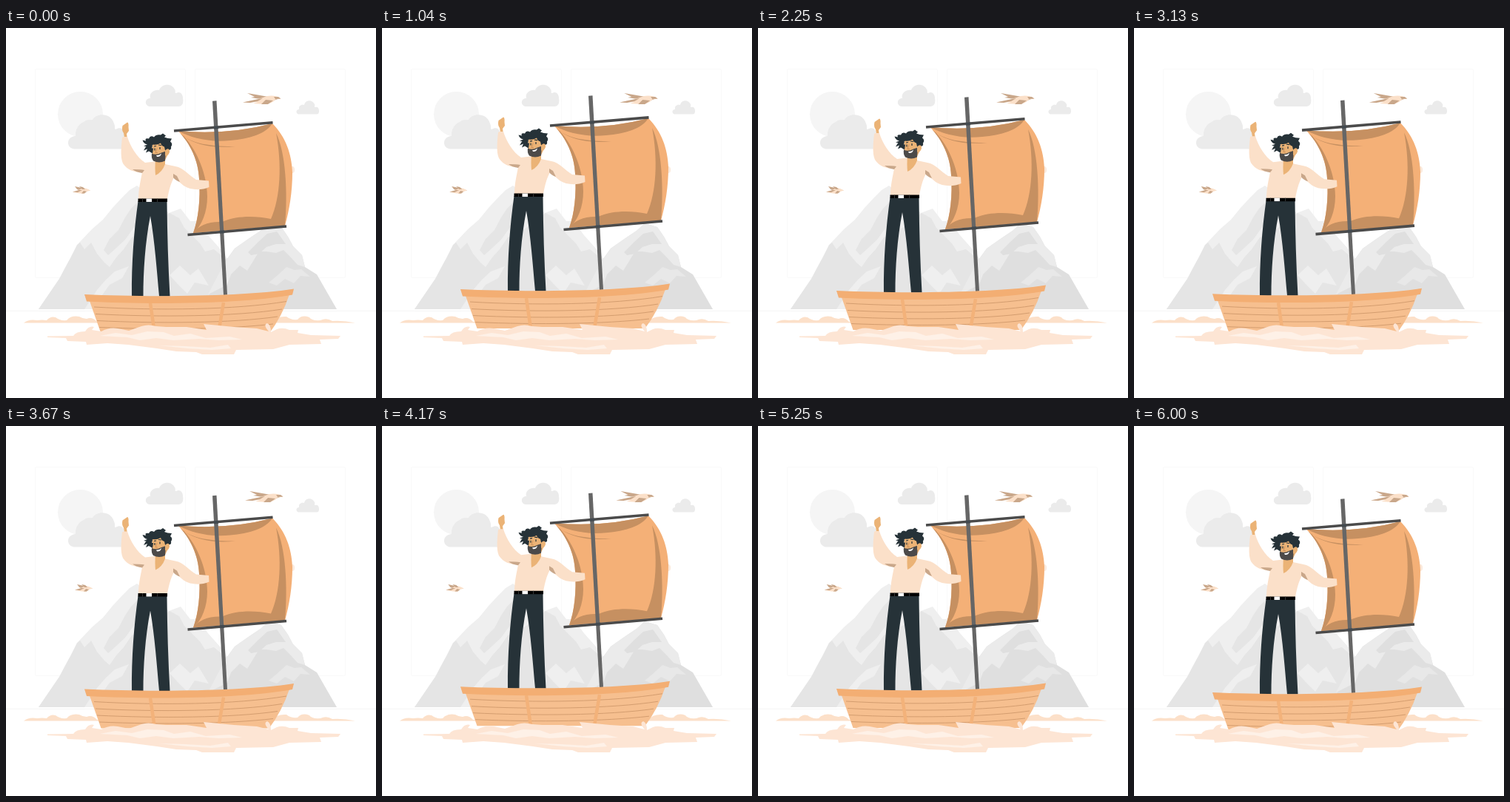
An HTML page that plays this animation: 500x500 px, repeating every 6040 ms.

```html
<!DOCTYPE html>
<html lang="en">
<head>
<meta charset="utf-8">
<title>Man on a sailing boat</title>
<style>
html, body { margin: 0; width: 100%; height: 100%; overflow: hidden; background: #fff; }
svg { display: block; width: 100%; height: 100%; }
.shade { fill: #c69061; }
.skin { fill: #ebb376; }
.shirt { fill: #fbe0c9; }
.dark { fill: #263238; }
.tan { fill: #c9a78a; }
</style>
</head>
<body>
<svg viewBox="0 0 500 500">
  <g fill="none" stroke="#f9f9f9">
    <rect x="39.5" y="55.5" width="203" height="282" rx="2"/>
    <rect x="255.5" y="55.5" width="203" height="282" rx="2"/>
    <path d="M0 382.300H500" stroke="#f4f4f4"/>
  </g>
  <circle cx="100.5" cy="116.5" r="30.5" fill="#f5f5f5"/>
  <g fill="#ebebeb">
    <path d="M92 163.500C81 162 81 147 94 146C93 137 99 129 105 127C109 123 113 125 117 124C123 114 142 115 146 129C148 133 146 136 148 137C156 132 160 138 160 145V163.500Z"/>
    <path d="M194 106C187 105 187 95 195 95C193 87 201 83 207 84C210 75 224 74 228 83C230 85 227 88 230 88C235 85 239 89 239 95C240 100 239 106 233 106Z"/>
    <path d="M395 116.500C391 115 392 110 396 110C395 105 399 103 403 104C404 97 414 96 417 103C418 105 416 107 418 107C421 106 423 108 423 112C423 115 422 116.500 420 116.500Z"/>
  </g>

  <!-- mountains -->
  <path fill="#efefef" d="M44 380L72 339L81 322L87 311L98 291L116 272L131 259L144 243L157 229L167 219L177 213L188 222L220 250L236 244L249 261L259 261L273 280L289 298L320 340L330 380Z"/>
  <path fill="#e5e5e5" d="M44 380L72 339L81 322L87 311L96 293L100 290L106 299L115 290L123 305L133 317L140 323L149 310L159 299L170 283L195 270L221 250L234 257L241 270L250 279L262 291L269 302L281 299L300 315L330 380Z"/>
  <path fill="#e5e5e5" d="M132 300L140 285L152 273L161 256L169 244L180 233L190 240L174 268L161 286L147 299L138 307Z"/>
  <path fill="#efefef" d="M106 380L123 354L135 340L147 329L166 322L157 338L140 347L127 365L119 380ZM221 334L235 321L249 334L260 325L274 348L255 344L245 359L232 346Z"/>
  <path fill="#dfdfdf" d="M265 380L285 340L296 316L309 298L329 284L344 274L355 264L372 269L381 282L388 295L400 307L404 323L420 333L447 380Z"/>
  <path fill="#ebebeb" d="M296 316L309 298L329 284L344 274L355 264L372 269L381 282L388 295L400 307L404 323L394 320L384 309L375 300L365 304L352 302L342 302L334 315L326 328L316 321L304 333L299 347L273 360Z"/>
  <path fill="#dfdfdf" d="M327 303L340 290L353 278L366 275L378 292L365 292L352 296L342 305L331 307Z"/>
  <path fill="#e8e8e8" d="M355 344L367 334L379 323L390 327L399 326L411 336L398 335L389 345L377 339L366 348Z"/>
  <ellipse cx="387" cy="191.500" rx="3" ry="4.500" fill="#fbe9db"/>

  <g id="birds">
    <path class="tan" d="M326 88Q338 90 349 92L363 94L370 95L359 99L344 96L331 94L336 93Z"/>
    <path class="shirt" d="M320 100.500L335 98L347 94Q356 90 366 92.500L371.500 95.500L364 96.500Q360 102 350 103L334 102L340 100Z"/>
    <path class="tan" d="M320 100.500L336 97L347 95L340 99L330 101ZM345 103L351 97L361 98L354 103ZM362 93L368 93L371.500 95.500L364 96Z"/>
    <path class="tan" d="M93 214L102 216L109 218L114 219.500L104 221L96 218Z"/>
    <path class="shirt" d="M90 221.500L98 219L104 216Q109 216 114 219.500L109 221L105 224L96 223Z"/>
    <path class="tan" d="M90 221.500L99 219L103 219L97 222ZM102 223.500L105 220L109 221L106 223.500ZM99 214L104 215L107 218L103 218Z"/>
  </g>

  <path fill="#fce0c9" d="M24 398.500Q31 393 42 395Q49 394 55 395Q60 389 67 391Q73 396 82 395Q88 388 99 390Q104 393 109 393Q117 390 123 397L360 397Q366 389 379 390Q385 395 394 394Q400 387 410 391Q413 396 425 395Q433 391 441 396Q456 395 472 398.500Z"/>

  <g id="boat">
    <!-- sail -->
    <path fill="#f4b077" d="M232.500 139Q300 145 360 129C378 147 386 170 387 195C387 221 383 246 377 267L253 277C260 258 263 231 261 204C260 179 249 156 232.500 139Z"/>
    <g class="shade">
      <path d="M232.500 139Q300 145 360 129C351 143 329 150 303 152C274 155 249 148 232.500 139Z"/>
      <path d="M232.500 139C247 158 281 160 310 160C279 163 257 158 241 147C259 167 272 199 272 228C272 248 265 267 253 277C260 258 263 231 261 204C260 179 249 156 232.500 139Z"/>
      <path d="M365 142C378 168 381 222 377 267L253 277C260 267 274 261 292 262C313 253 337 254 358 258C371 229 373 184 365 142Z"/>
    </g>
    <path d="M227 139L360.500 127.800M245.500 279.500L379 268" fill="none" stroke="#4b4b4b" stroke-width="3.600"/>
    <path d="M279 98.800L284.500 98.300L299 360.500L294 361Z" fill="#666"/>
    <path d="M281 134.800L287 134.200M289 275.800L295 275.200" stroke="#434a50" stroke-width="4"/>

    <!-- man -->
    <path class="skin" d="M160 148L159 142Q156 138 157.500 132L164 127.500Q166 128 165.500 134L166 139L163 143L164 150Z"/>
    <path class="shirt" d="M159 147L164 147C168 160 177 175 188 182L205 180L215 184L229 187C240 189 247 199 257 205L274 206.500L274.500 215C263 220 249 219 240 213L227 202C222 211 220 221 218 231L179 231C179 218 182 206 184 195C173 195 164 192 158 183C154 174 156 158 157 148Z"/>
    <path class="tan" d="M171 191Q181 191 187 192L184 196Q176 195 171 191ZM226 197L231 200L235 208Q229 206 226 202Z"/>
    <path class="skin" d="M202 177L215 176L215 184Q211 195 202 199Q201 190 202 177Z"/>
    <path class="dark" d="M178.500 234H217.500Q218 300 221.500 362.500H207C204 330 201 288 195 254C188 290 185.500 329 185.500 362.500H170C169.500 318 173 273 178.500 234Z"/>
    <path d="M178.500 230.500H218V235H178.500Z"/>
    <path d="M189.500 230.500H197V235H189.500Z" fill="#fff"/>
    <path d="M184.500 230.500V235M204.500 230.500V235" stroke="#444" stroke-width=".8"/>
    <g transform="translate(-1 -.5)">
      <path class="skin" d="M199 156Q209 151 218 158L220 164Q224 168 219 173L215 181L200 178Q197 168 199 156Z"/>
      <path d="M198 170Q204 173 211 169L217 167L216 180Q208 184 200 180Q197 176 198 170Z" fill="#4c4a49"/>
      <path d="M204 172.500Q208 173 211 170Q210 175 205 174.500Z" fill="#fff"/>
      <path class="dark" d="M200 158Q195 162 187 160L192 158Q187 157 185.500 152L190 153Q188 149 194 150Q196 145 201 148Q204 144 210 145L213 143L217 146L215 148Q219 150 225 150L223 154Q227 157 224 161Q225 166 220 165L217 170L215 161Q211 160 210 156Q205 159 200 158Z"/>
      <path d="M194 158L199 159L198 163L200 163L199 170L194 167L190 169L192 164L187 166L190 161Z" class="dark"/>
      <path class="skin" d="M216 166Q221 161 222 167Q221 173 216 173Z"/>
      <path d="M202 163V166M209 161.500V164.500M201 160.500L204 160M207 158.500L211 159" stroke="#263238" stroke-width="1.200"/>
      <path d="M205 163L203 169L206 169" fill="none" stroke="#c58753" stroke-width=".8"/>
    </g>

    <!-- hull -->
    <path fill="#f6bf8f" d="M113 369L128.500 413H355.500Q373 390 383 360Z"/>
    <g fill="none" stroke="#d0996b" stroke-width=".9">
      <path d="M119 377C205 382 310 381 379 369.500"/>
      <path d="M121 386.500C205 391 310 390 373 380"/>
      <path d="M123 395.500C205 399.500 305 399 367 390"/>
      <path d="M126 404.500C210 408 301 407 361 400"/>
    </g>
    <path d="M195 372L201 413M294 371L287 413" fill="none" stroke="#f3b27a" stroke-width="4.500"/>
    <path fill="#f3ae73" d="M106 360C194 364 322 363 389 352.500L387 360.500C321 373 195 374 109 369.500Z"/>
  </g>

  <!-- water -->
  <path fill="#fde5d4" d="M56 416.500L91 416Q94 410 107 410Q112 402 119 404L116 408L129 410Q139 404 151 406L166 409L183 403Q192 400 203 403L216 404L244 404L271 408L267 400L308 404L339 406L355 410Q347 401 353 399Q358 401 358 411L366 407Q374 404 383 408L395 408L394 412L412 415L452 416L449 420L424 421L426 427L383 428L361 434L311 435L308 441L265 441L257 438L230 437L204 433L165 428L137 426L109 428L108 424L83 423L81 419L56 418Z"/>
  <path fill="#fef1e7" d="M127 416L148 412L170 415L191 410L213 411L227 416L249 413L270 419L302 417L319 421L287 422L261 420L226 422L203 419L181 422L164 418ZM207 429L242 430L276 432L300 428L304 433L278 435L245 433Z"/>
</svg>
<script>
const boat = document.getElementById('boat');
const birds = document.getElementById('birds');
const LOOP = 6040, BOB = 3000, LIFT = 10, SHAKE = 6000;
const sway = [0, -1, 2, -4, 4, -4, 4, -4, 2, -1, 0];

const bobAt = t => -LIFT * (1 - Math.abs(1 - 2 * (t % BOB) / BOB));

function swayAt(t) {
  const p = t % SHAKE / SHAKE * 10, i = Math.floor(p);
  return sway[i] + (sway[i + 1] - sway[i]) * (p - i);
}

function draw(now) {
  const t = now % LOOP;
  boat.setAttribute('transform', `translate(0 ${bobAt(t)})`);
  birds.setAttribute('transform', `translate(${swayAt(t)} 0)`);
  requestAnimationFrame(draw);
}
draw(performance.now());
</script>
</body>
</html>
```
